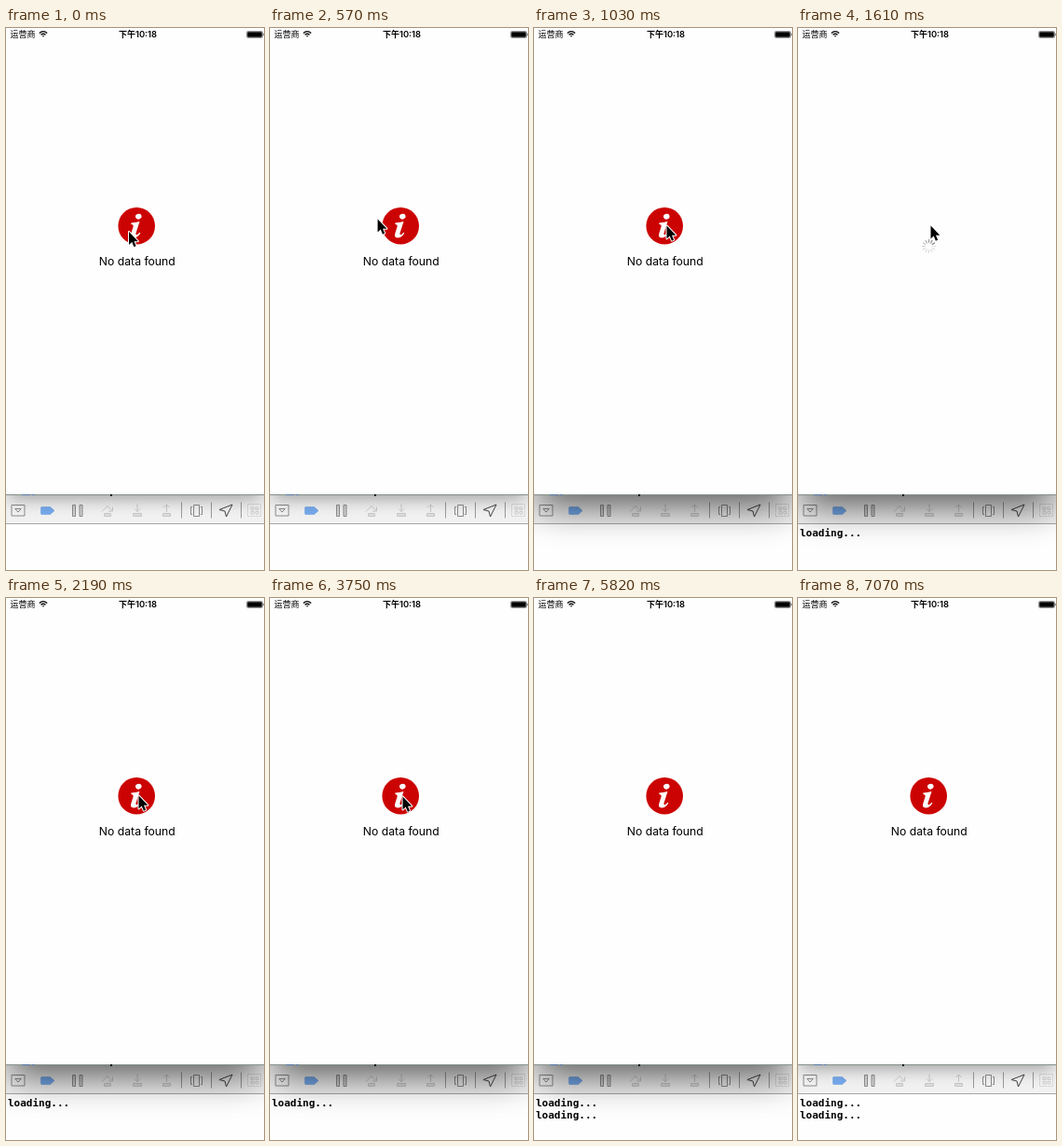
Recreate the animation shown at these times as an HTML page. Size 277 by 580 pixels, loop 7.1 s.

```html
<!DOCTYPE html>
<html lang="zh">
<head>
<meta charset="utf-8">
<title>Empty state reload</title>
<style>
  html, body { margin: 0; width: 100%; height: 100%; overflow: hidden; background: #fff; }
  svg { display: block; width: 100%; height: 100%; }
  .status { font: 9px "Noto Sans CJK SC", "Noto Sans CJK", "Inter", sans-serif; }
  .clock { font-weight: 700; }
  .clock tspan { font: 600 9.4px "Inter", sans-serif; }
  .label { font: 12.2px "Inter", "Roboto", sans-serif; }
  .console { font: bold 11px "DejaVu Sans Mono", monospace; }
</style>
</head>
<body>
<svg viewBox="0 0 277 580">
  <defs>
    <filter id="wide" filterUnits="userSpaceOnUse" x="-70" y="340" width="420" height="260">
      <feGaussianBlur stdDeviation="20"/>
    </filter>
    <filter id="narrow" filterUnits="userSpaceOnUse" x="-60" y="380" width="400" height="220">
      <feGaussianBlur stdDeviation="10"/>
    </filter>
  </defs>

  <rect width="277" height="580" fill="#fefefe"/>
  <rect y="499" width="277" height="31" fill="#f1f1f1"/>
  <path d="M0 530.5H277" stroke="#a6a6a6"/>

  <!-- debugger toolbar -->
  <g fill="none" transform="translate(0 .5)">
    <g stroke="#8a8a8a">
      <path d="M6 510h14v11.500h-14zM9.800 514h6.400l-3.200 3.600z"/>
      <path d="M71.500 510h3v12h-3zM79 510h3v12h-3z" fill="#d0d0d0"/>
      <path d="M201.500 510h6v12h-6zM200 512h-1.500v8h1.500M209 512h1.500v8h-1.500"/>
    </g>
    <path d="M37.500 513q0-1 1-1h9l4.500 4-4.500 4h-9q-1 0-1-1z" fill="#75a9ec" stroke="#6f9fdd" stroke-width=".6"/>
    <g stroke="#c8c8c8">
      <path d="M103 517l6-6 5 5M114.500 512v4.500h-4.500"/>
      <path d="M141 509v8M138 514l3 3 3-3M172.500 517.500v-8M169.500 512.500l3-3 3 3"/>
      <path d="M105.500 519h7v3h-7zM136.500 519h9v3h-9zM168.500 519h8v3h-8z" fill="#ddd"/>
    </g>
    <path d="M188.500 507v17M220.500 507v17M252.500 507v17" stroke="#999"/>
    <path d="M243 509.500l-6.500 13-1.500-6-6-1.500z" stroke="#444" stroke-linejoin="round"/>
    <g stroke="#cdcdcd">
      <path d="M259.500 509h14v13h-14z" stroke-dasharray="2 1"/>
      <path d="M263 512.500h3v2.500h-3zM268 512.500h3v2.500h-3zM263 517h3v2.500h-3zM268 517h3v2.500h-3z"/>
    </g>
  </g>

  <g class="console">
    <text id="line1" x="2" y="544">loading...</text>
    <text id="line2" x="2" y="557">loading...</text>
  </g>

  <rect id="idleShadow" x="3" y="420" width="271" height="82" opacity=".4" filter="url(#narrow)"/>
  <rect id="activeShadow" x="4" y="400" width="269" height="112" opacity=".63" filter="url(#wide)"/>

  <!-- phone screen -->
  <rect width="277" height="499" fill="#fefefe"/>
  <path d="M0 499.500H277" stroke="#86938a"/>
  <path d="M17 499.500h9M28 499.500h3" stroke="#5a7bab"/>
  <rect x="112" y="499" width="2" height="2"/>

  <text class="status" x="4.500" y="10">运营商</text>
  <text class="status clock" x="141.500" y="10" text-anchor="middle">下午<tspan>10:18</tspan></text>
  <g fill="none" stroke="#000" stroke-width="1.300">
    <path d="M35.800 5.500q4.200-3.600 8.400 0M37.500 7.300q2.500-2.100 5 0"/>
    <path d="M38.700 8.300h2.600L40 9.700z" fill="#000" stroke="none"/>
  </g>
  <rect x="258.500" y="3.500" width="17" height="7" rx="1.300" fill="none" stroke="#777" stroke-width=".8"/>
  <rect x="259.200" y="4.200" width="15.600" height="5.600" rx=".8"/>
  <path d="M276.300 5.700q.9.300.9 1.300t-.9 1.300z" fill="#555"/>

  <g id="empty">
    <circle cx="140.200" cy="211.800" r="19.800" fill="#cc0303"/>
    <g fill="#fff">
      <ellipse cx="142.300" cy="201.700" rx="3.300" ry="2.900" transform="rotate(-15 142.300 201.700)"/>
      <path d="M134.500 208.600q4.500-.3 9-1.500l-4 12.500q-.5 1.700.6 1.700 1.300 0 3.300-2.500l.9.600q-3 5-7 5-4.300 0-3.100-4.200l2.400-7.800q.6-2-2.300-2.500z"/>
    </g>
    <text class="label" x="140.800" y="253.700" text-anchor="middle">No data found</text>
  </g>

  <g id="spinner" transform="translate(140.500 233.500)" stroke="#666" stroke-width="1.200" stroke-linecap="round"></g>

  <path id="cursor" d="M0 0V14L3.200 11.100 5.400 16.200 7.600 15.200 5.500 10.200H9.800z"
        stroke="#fff" stroke-width="2" stroke-linejoin="round" paint-order="stroke"/>
</svg>

<script>
const LOOP = 7100, TICK = 57.2, SPOKES = 12;
const $ = id => document.getElementById(id);
const clamp = v => Math.max(0, Math.min(1, v));
const show = (id, on) => $(id).setAttribute('display', on ? 'inline' : 'none');

// Each reload: tap, spinner gone, first visible step of the fade, fade complete
const reloads = [
  { start: 1270, clear: 1900, fade: 2020, end: 2190 },
  { start: 4050, clear: 4740, fade: 4860, end: 4980 }
];

// [time, x, y] of the pointer tip
const path = [[0, 132, 218], [340, 120, 209], [570, 115.5, 204.5], [630, 118, 204.5], [740, 128.5, 204.5], [858, 142.5, 211.5]];

const spokes = Array.from({ length: SPOKES }, (_, i) => {
  const spoke = document.createElementNS('http://www.w3.org/2000/svg', 'path');
  spoke.setAttribute('d', 'M0-4.200V-7');
  spoke.setAttribute('transform', `rotate(${i * 360 / SPOKES})`);
  return $('spinner').appendChild(spoke);
});

function pointerAt(t) {
  if (t >= 5760) return [172.5, 212];
  if (t >= 3750) return [142.5, 212.5];
  const q = Math.floor((t + 3) / TICK) * TICK;
  const next = path.findIndex(p => p[0] > q);
  if (next < 0) return path[path.length - 1].slice(1);
  const [a, b] = [path[next - 1], path[next]];
  const k = (q - a[0]) / (b[0] - a[0]);
  return [1, 2].map(i => a[i] + (b[i] - a[i]) * k);
}

function emptyOpacity(t, r) {
  if (!r || t >= r.end) return 1;
  if (t < r.fade) return 0;
  const q = Math.floor((t - r.fade + 3) / TICK) * TICK;
  return clamp((q + TICK) / (r.end - r.fade + TICK));
}

function render(t) {
  const reload = reloads.filter(r => t >= r.start).pop();
  const spinning = !!reload && t < reload.clear;
  const active = t >= 1030 && t < 7070;

  show('line1', t >= reloads[0].start);
  show('line2', t >= reloads[1].start);
  show('activeShadow', active);
  show('idleShadow', !active);
  $('empty').setAttribute('opacity', emptyOpacity(t, reload));

  show('spinner', spinning);
  if (spinning) {
    const age = t - reload.start;
    const head = Math.floor(age / (1000 / SPOKES)) + 10;
    $('spinner').setAttribute('opacity', clamp(age / 250));
    spokes.forEach((spoke, i) => {
      const lag = (head - i + SPOKES) % SPOKES;
      spoke.setAttribute('opacity', Math.max(.22, .85 - lag * .11));
    });
  }

  show('cursor', t < 5820);
  $('cursor').setAttribute('transform', `translate(${pointerAt(t)})`);
}

const origin = performance.now();
function frame() {
  render((performance.now() - origin) % LOOP);
  requestAnimationFrame(frame);
}
render(0);
requestAnimationFrame(frame);
</script>
</body>
</html>
```
